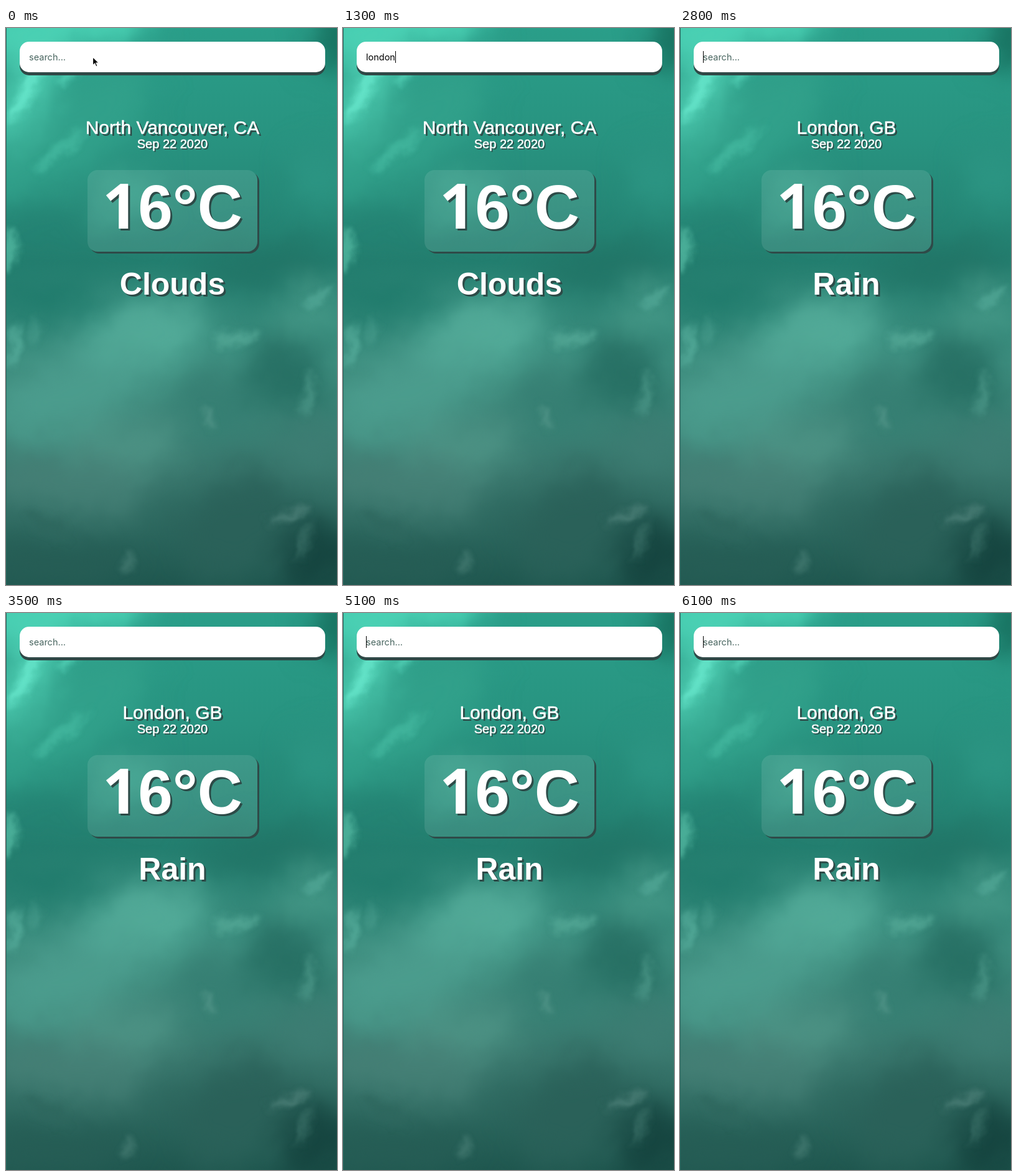
Recreate the animation shown at these times as an HTML page. Size 532x894 px, loop 6200 ms.

```html
<!DOCTYPE html>
<html lang="en">
<head>
<meta charset="utf-8">
<title>Weather</title>
<style>
  html, body { margin: 0; width: 100%; height: 100%; overflow: hidden; background: #2a8575; }
  #app { position: relative; width: 532px; height: 894px; overflow: hidden;
    font-family: "Liberation Sans", Arial, sans-serif; color: #fff; }
  #app > * { position: absolute; }
  #edge { left: 0; top: 0; width: 1px; height: 100%; background: #23655c; }
  #search { left: 22px; top: 22px; width: 491px; height: 49px; border-radius: 15px;
    background: #fff; box-shadow: 0 5px #2f4846; }
  #query { position: absolute; left: 15px; top: 0; line-height: 49px; white-space: pre;
    font-family: Inter, sans-serif; font-size: 14.5px; color: #000; }
  #query.empty { color: #48655f; }
  #caret { position: absolute; top: 15px; width: 1px; height: 19px; background: #000; }
  .line { left: 0; width: 535px; text-align: center; white-space: pre;
    line-height: 1; text-shadow: 3px 3px #2d4a47; }
  #place, #date { -webkit-text-stroke: .5px #fff; }
  #place { top: 144.5px; font-size: 30px; }
  #date { top: 176px; font-size: 20px; text-shadow: 2px 2px #2d4a47; }
  #card { left: 131px; top: 228px; width: 273px; height: 131px; border-radius: 16px;
    background: rgba(255, 255, 255, .1); box-shadow: 3px 3px #2f4a48; }
  #temp { top: 236.5px; font-size: 100px; font-weight: bold; }
  #temp span { font-family: "Open Sans", sans-serif; line-height: 0; }
  #sky { top: 385.5px; font-size: 50px; font-weight: bold; }
  #pointer { left: 138px; top: 45px; }
</style>
</head>
<body>
<div id="app">
  <svg id="water" width="532" height="894" viewBox="0 0 532 894">
    <defs>
      <linearGradient id="depth" x2="0" y2="1">
        <stop offset="0" stop-color="#2a9e89"/>
        <stop offset=".2" stop-color="#289380"/>
        <stop offset=".42" stop-color="#237e6f"/>
        <stop offset=".6" stop-color="#3f9081"/>
        <stop offset=".8" stop-color="#38766c"/>
        <stop offset="1" stop-color="#1f574f"/>
      </linearGradient>
      <filter id="soft" filterUnits="userSpaceOnUse" x="-150" y="-150" width="832" height="1194"
        color-interpolation-filters="sRGB">
        <feGaussianBlur stdDeviation="26" result="b"/>
        <feTurbulence type="fractalNoise" baseFrequency=".014" numOctaves="3" seed="4"/>
        <feDisplacementMap in="b" scale="40" xChannelSelector="R" yChannelSelector="G"/>
      </filter>
      <filter id="wisp" filterUnits="userSpaceOnUse" x="-150" y="-150" width="832" height="1194"
        color-interpolation-filters="sRGB">
        <feGaussianBlur stdDeviation="6" result="b"/>
        <feTurbulence type="fractalNoise" baseFrequency=".03" numOctaves="3" seed="9"/>
        <feDisplacementMap in="b" scale="26" xChannelSelector="R" yChannelSelector="G"/>
      </filter>
    </defs>
    <rect width="532" height="894" fill="url(#depth)"/>
    <g id="blobs" filter="url(#soft)"></g>
    <g id="wisps" filter="url(#wisp)" opacity=".75"></g>
  </svg>
  <div id="edge"></div>
  <div id="search"><span id="query"></span><i id="caret"></i></div>
  <div id="place" class="line"></div>
  <div id="date" class="line">Sep 22 2020</div>
  <div id="card"></div>
  <div id="temp" class="line"><span>1</span>6°C</div>
  <div id="sky" class="line"></div>
  <svg id="pointer" width="14" height="20" viewBox="0 0 14 20">
    <path d="M1.5 1.5V15L4.7 12 6.8 17 9 16 7 11.2H11.2Z" stroke="#fff" stroke-width="1.2"/>
  </svg>
</div>
<script>
const $ = id => document.getElementById(id);

// Each blob: centre x, centre y, radius x, radius y, tilt, colour
const paint = (id, blobs) => {
  $(id).innerHTML = blobs.map(([x, y, rx, ry, tilt, fill]) =>
    `<ellipse rx="${rx}" ry="${ry}" fill="${fill}" transform="translate(${x} ${y}) rotate(${tilt})"/>`).join('');
};
paint('blobs', [
  [90, 170, 170, 70, -35, '#31a08a'],
  [70, 0, 170, 45, -8, '#4bd2b5'],
  [25, 115, 35, 90, 30, '#50d0b4'],
  [540, 20, 50, 50, 30, '#17705f'],
  [510, 240, 50, 50, 0, '#2c9583'],
  [190, 270, 60, 35, -15, '#37a08b'],
  [60, 435, 90, 35, 5, '#207b6c'],
  [420, 385, 110, 35, 0, '#217466'],
  [225, 490, 110, 55, -10, '#52aa98'],
  [100, 590, 140, 60, -20, '#4b9c8d'],
  [490, 450, 60, 35, -15, '#459887'],
  [450, 555, 70, 60, 30, '#277064'],
  [340, 610, 70, 50, 20, '#367f73'],
  [190, 675, 100, 40, -5, '#4d9385'],
  [90, 730, 140, 50, 5, '#447f75'],
  [490, 670, 60, 40, -15, '#3d7d73'],
  [375, 800, 100, 75, -30, '#2a6159'],
  [500, 850, 50, 70, 20, '#15443f'],
  [80, 870, 120, 35, 0, '#265d55']
]);
paint('wisps', [
  [35, 100, 10, 60, 30, '#6cecd1'],
  [120, 60, 9, 45, 50, '#5adabe'],
  [90, 195, 10, 55, 50, '#46bba2'],
  [5, 355, 10, 35, 0, '#5ac0a8'],
  [12, 510, 7, 40, 12, '#5bb3a1'],
  [45, 490, 6, 22, 10, '#4b9f8f'],
  [370, 498, 40, 10, -10, '#57ab99'],
  [500, 435, 28, 9, -30, '#54a998'],
  [485, 590, 9, 35, 10, '#4c9788'],
  [325, 625, 6, 20, -20, '#5a9b8e'],
  [455, 780, 34, 7, -20, '#55877f'],
  [480, 825, 6, 30, 20, '#3f756c'],
  [70, 800, 40, 14, 30, '#2e675e'],
  [195, 858, 9, 18, 10, '#467c73']
]);

const LOOP = 6200, STEP = 100, SENT = 1600, BLINK = 1100;
const word = 'london', keys = [500, 600, 800, 900, 1000, 1200];

function draw(now) {
  const t = Math.floor(now % LOOP / STEP) * STEP;
  const sent = t >= SENT;
  const typed = sent ? '' : word.slice(0, keys.filter(k => t >= k).length);
  $('query').textContent = typed || 'search...';
  $('query').className = typed ? '' : 'empty';
  $('caret').style.left = 15 + (typed ? $('query').offsetWidth : 0) + 'px';
  const lit = sent ? (t - SENT + 50) % BLINK < BLINK / 2 : t >= 300;
  $('caret').hidden = !lit;
  $('pointer').style.display = t < keys[0] ? '' : 'none';
  $('place').textContent = sent ? 'London, GB' : 'North Vancouver, CA';
  $('sky').textContent = sent ? 'Rain' : 'Clouds';
}
const start = performance.now();
(function tick() {
  draw(performance.now() - start);
  requestAnimationFrame(tick);
})();
</script>
</body>
</html>
```
